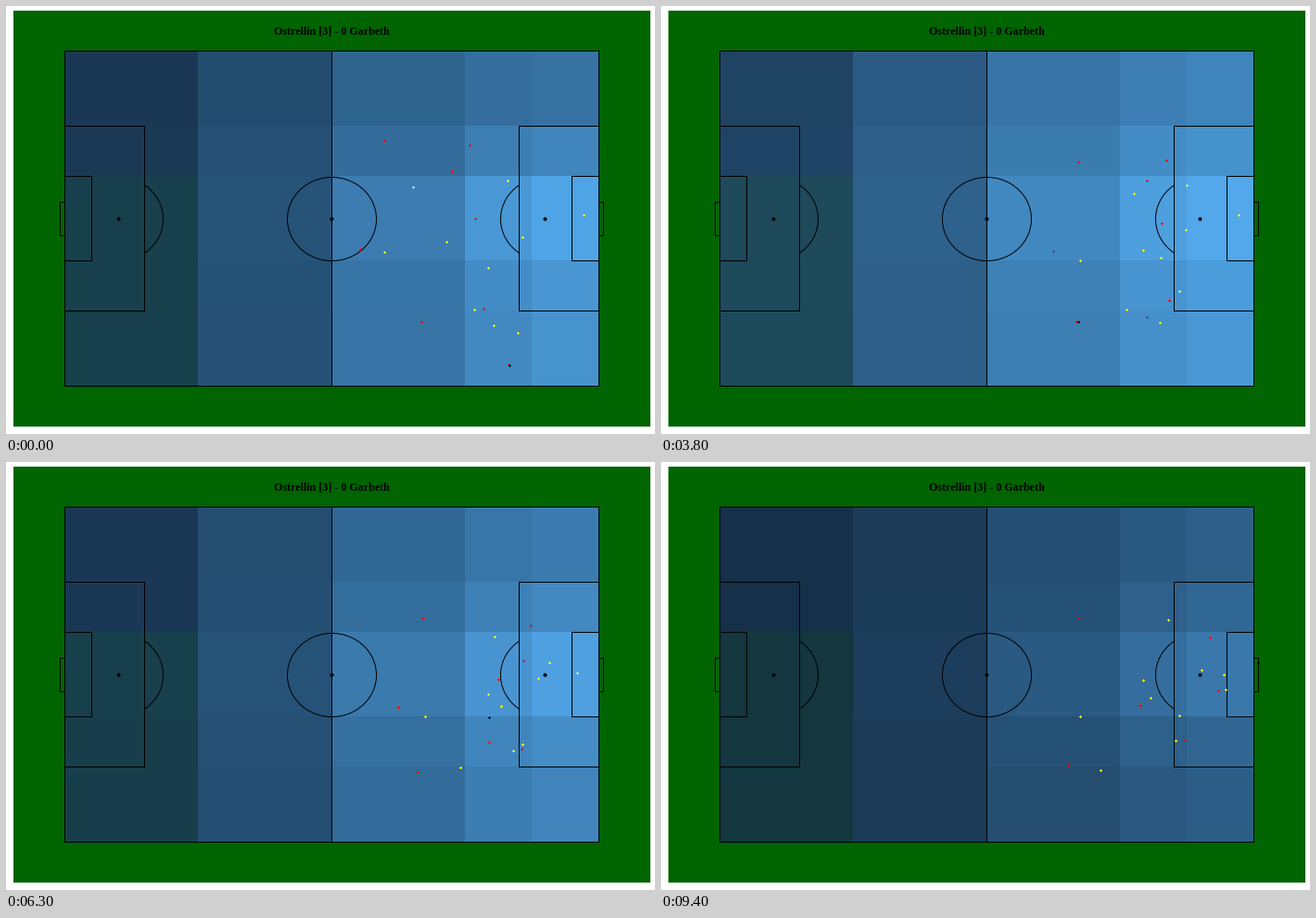
Write a matplotlib script that moves like this. It is 700x461 px and loops after 10 s.

```python
import numpy as np
import matplotlib.pyplot as plt
from matplotlib.animation import FuncAnimation
from matplotlib.patches import Circle, Rectangle

W, H, DPI = 700, 461, 64
PX = 72 / DPI                      # one pixel in points
STEP, LOOP, END = 100, 10000, 9400
SETTLE = 3800                      # the shape is set, the final attack begins
LEFT, RIGHT, TOP, BOTTOM, MID = 63, 639, 48, 409, 229

# Each player: start, place when settled, final place (the last one repeats)
ATTACK = [
    [(408, 145), (450, 168)],
    [(500, 150), (545, 166), (592, 189)],
    [(481, 178), (524, 188), (601, 246)],
    [(506, 229), (540, 234), (520, 235)],
    [(382, 262), (423, 264)],
    [(515, 326), (548, 317), (565, 300)],
    [(542, 386), (524, 335), (517, 262)],
    [(448, 340), (448, 340), (439, 326)],
]
DEFENCE = [
    [(623, 225), (623, 225), (607, 229)],
    [(439, 195), (510, 202), (547, 170)],
    [(541, 188), (567, 193), (609, 245)],
    [(557, 249), (566, 241), (583, 224)],
    [(475, 254), (520, 263), (520, 235)],
    [(520, 282), (539, 271), (528, 254)],
    [(408, 265), (452, 274)],
    [(505, 327), (502, 327), (474, 332)],
    [(526, 344), (538, 341), (559, 273)],
    [(552, 352), (559, 307), (555, 300)],
]
PLAYERS = ATTACK + DEFENCE
START, SET, FINISH = np.array(
    [p + p[-1:] * (3 - len(p)) for p in PLAYERS], float).swapaxes(0, 1)
COLOURS = ["#ff0000"] * len(ATTACK) + ["#ffff00"] * len(DEFENCE)

# Carry, pass, hold, through ball, shot: time, x, y
BALL = np.array([
    (0, 542, 386), (1850, 538, 374), (3300, 448, 340), (5100, 452, 337),
    (7100, 566, 232), (8800, 634, 216), (9400, 643, 215)]).T

COLS = np.array([63, 207, 351, 495, 567, 640])
ROWS = np.array([48, 129, 183, 274, 328, 410])
COLD, HOT = np.array([19, 43, 67]), np.array([86, 177, 247])
TEAL = np.array([-2, 6, -10])


def players_at(t):
    u = min(t / SETTLE, 1)
    v = max(t - SETTLE, 0) / (END - SETTLE)
    return START + (SET - START) * (1 - (1 - u) ** 2) + (FINISH - SET) * v


def ball_at(t):
    return np.array([np.interp(t, BALL[0], axis) for axis in BALL[1:]])


def zones_at(t):
    """Heat rises towards goal, peaks centrally and leans to the ball's side."""
    x = ((COLS[:-1] + COLS[1:]) / 2 - LEFT) / (RIGHT - LEFT)
    y = ((ROWS[:-1] + ROWS[1:]) / 2 - MID)[:, None] / 140
    depth = 0.85 / (1 + np.exp(-5 * (x - 0.52)))
    lean = 0.21 * y * (ball_at(t)[1] - MID) / 157
    heat = depth + depth ** 2 * (0.27 - 0.45 * np.abs(y) ** 0.6 + lean)

    times = [2000, 3800, 5800, 6300, 7100, 9400]
    gain = np.interp(t, times, [1, 1.01, 1.03, 0.97, 0.84, 0.66])
    gamma = np.interp(t, times, [1, 0.75, 0.85, 1, 1.15, 1.3])
    rgb = COLD + (HOT - COLD) * (gain * heat ** gamma)[..., None]
    rgb[2:, 0] += TEAL
    return np.clip(rgb, 0, 255) / 255


fig = plt.figure(figsize=(W / DPI, H / DPI), dpi=DPI, facecolor="white")
ax = fig.add_axes([0, 0, 1, 1])
ax.set(xlim=(0, W), ylim=(H, 0))
ax.axis("off")


def line(xs, ys):
    ax.plot(np.array(xs) + 0.5, np.array(ys) + 0.5, color="black", lw=PX,
            snap=False, zorder=3)


def box(x0, y0, x1, y1):
    line([x0, x1, x1, x0, x0], [y0, y0, y1, y1, y0])


def arc(cx, start, stop):
    a = np.linspace(start, stop, 120)
    line(cx + 48 * np.cos(a), MID + 45 * np.sin(a))


ax.add_patch(Rectangle((8, 5), 687, 448, fc="#006400", lw=0, aa=False))
zones = [ax.add_patch(Rectangle((x0, y0), x1 - x0, y1 - y0, lw=0, aa=False))
         for y0, y1 in zip(ROWS, ROWS[1:]) for x0, x1 in zip(COLS, COLS[1:])]

box(LEFT, TOP, RIGHT, BOTTOM)
line([351, 351], [TOP, BOTTOM])
for x0, y0, x1, y1 in [(63, 129, 149, 328), (63, 183, 92, 274), (58, 211, 63, 247)]:
    box(x0, y0, x1, y1)
    box(LEFT + RIGHT - x1, y0, LEFT + RIGHT - x0, y1)
arc(351, 0, 2 * np.pi)
bend = np.arccos(28.5 / 48)
arc(121, -bend, bend)
arc(581, np.pi - bend, np.pi + bend)
for x in (121, 351, 581):
    ax.add_patch(Circle((x + 0.5, MID + 0.5), 2, fc="black", lw=0, zorder=3))

ax.text(351, 31, "Ostrellin [3] - 0 Garbeth", ha="center", va="baseline",
        family="Liberation Serif", weight="bold", size=12 * PX, color="black")

style = dict(marker="P", s=(3 * PX) ** 2, linewidths=0, antialiased=False)
dots = ax.scatter(*START.T, color=COLOURS, zorder=4, **style)
ball = ax.scatter(*ball_at(0), color="black", zorder=5, **style)


def draw(i):
    t = min(i * STEP, END)
    for zone, colour in zip(zones, zones_at(t).reshape(-1, 3)):
        zone.set_facecolor(colour)
    dots.set_offsets(np.round(players_at(t)) + 0.5)
    ball.set_offsets([np.round(ball_at(t)) + 0.5])
    return [dots, ball]


anim = FuncAnimation(fig, draw, frames=LOOP // STEP, interval=STEP,
                     repeat=True, repeat_delay=0, blit=False)
plt.show()
```
